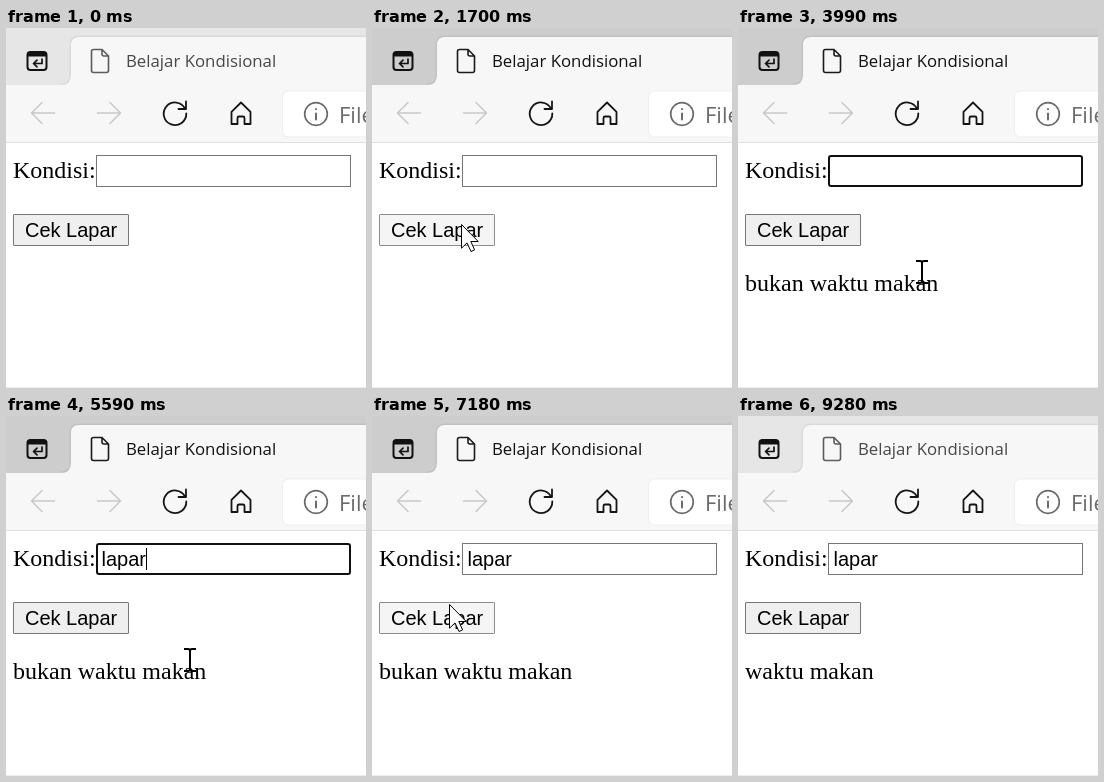
These frames come from a looping animation (360 by 360 pixels, 9.33 s). An HTML page:

```html
<!DOCTYPE html>
<html lang="id">
<head>
<meta charset="utf-8">
<title>Belajar Kondisional</title>
<style>
  html, body { margin: 0; width: 100%; height: 100%; overflow: hidden; background: #fff; }
  svg { display: block; width: 100vw; height: 100vh; }
  .line { fill: none; stroke-linecap: round; stroke-linejoin: round; }
  .serif { font: 24px "Liberation Serif", "Times New Roman", serif; }
  .sans { font: 20px "Liberation Sans", Arial, sans-serif; }
  .ui { font-family: "Open Sans", "Noto Sans", sans-serif; }
</style>
</head>
<body>
<svg viewBox="0 0 360 360">
  <rect width="360" height="360" fill="#fff"/>
  <rect y="359" width="360" height="1" fill="#ececec"/>

  <!-- tab strip -->
  <rect id="strip" width="360" height="58"/>
  <path d="M55 57Q65 57 65 47V17Q65 9 73 9H361" fill="none" stroke="#000" stroke-opacity=".06" stroke-width="3"/>
  <path d="M55 57Q65 57 65 47V17Q65 9 73 9H360V57Z" fill="#f7f7f7"/>
  <g class="line" stroke="#111" stroke-width="2">
    <rect x="21.5" y="24" width="19" height="18" rx="3"/>
    <path d="M22 26.5H40" stroke-width="4" stroke-linecap="butt"/>
    <path d="M36 31V35.5H28M31 32.2L27.5 35.5L31 38.8" stroke-width="1.7"/>
  </g>
  <path id="fileIcon" class="line" stroke-width="1.6" d="M87.5 21.5H96L102.5 28V42.5Q102.5 44.5 100.5 44.5H87.5Q85.5 44.5 85.5 42.5V23.5Q85.5 21.5 87.5 21.5ZM96 21.5V26Q96 28 98 28H102.5"/>
  <text id="tabTitle" class="ui" x="120" y="39" font-size="16.8">Belajar Kondisional</text>

  <!-- toolbar -->
  <rect y="57" width="360" height="58" fill="#f7f7f7"/>
  <rect y="114" width="360" height="1" fill="#e0e0e0"/>
  <g class="line" stroke="#c9c9c9" stroke-width="1.6">
    <path d="M48.5 85H26M36 74.5L25.5 85L36 95.5"/>
    <path d="M91.5 85H114M104 74.5L114.5 85L104 95.5"/>
  </g>
  <g class="line" stroke="#151515" stroke-width="1.8">
    <path d="M179 80.5A11.3 11.3 0 1 0 180.3 85.5M180 73.5V81H172.5"/>
    <path d="M225.5 83.8L235 74.5L244.5 83.8V96H238.5V90Q238.5 88.5 237 88.5H233Q231.5 88.5 231.5 90V96H225.5Z"/>
  </g>
  <rect x="276.5" y="63" width="95" height="46" rx="6" fill="#fff" stroke="#efefef"/>
  <g class="line" stroke="#6b6b6b" stroke-width="1.7">
    <circle cx="310" cy="86" r="11.3"/>
    <path d="M310 85.5V91.5M310 81V81.2" stroke-width="2"/>
  </g>
  <text class="ui" x="333" y="95" font-size="22" fill="#6b6b6b">File</text>

  <!-- page -->
  <text class="serif" x="7" y="150">Kondisi:</text>
  <rect id="field" fill="#fff"/>
  <text id="typed" class="sans" x="95.5" y="150"></text>
  <rect id="caret" y="132" width="1" height="22"/>
  <rect id="button" x="7.5" y="186.5" width="115" height="31" rx=".5"/>
  <text class="sans" x="19" y="209">Cek Lapar</text>
  <text id="answer" class="serif" x="7" y="263"></text>

  <g id="pointer">
    <path id="arrow" d="M.5 .5V24.2L6 18.9L10 27.5L13.6 25.9L9.8 17.5H17.2Z" fill="#fff" stroke="#000"/>
    <path id="beam" d="M-6 -11H-2Q0 -11 0 -9Q0 -11 2 -11H6M0 -9V9M-6 11H-2Q0 11 0 9Q0 11 2 11H6" fill="none" stroke="#000" stroke-width="2"/>
  </g>
</svg>
<script>
const LOOP = 9330;
const el = {};
document.querySelectorAll('[id]').forEach(node => el[node.id] = node);

const set = (node, attrs) => {
  for (const name in attrs) node.setAttribute(name, attrs[name]);
};
const show = (node, on) => set(node, { visibility: on ? 'visible' : 'hidden' });
const between = (v, lo, hi) => v >= lo && v < hi;

// Pointer moves; each key is [time, x, y].
const moves = [
  { start: 350, step: 64.5, keys: [[200, 336, 385], [350, 301, 344], [1060, 122, 207], [1270, 90, 197], [1320, 89, 196]] },
  { start: 2320, step: 66, keys: [[2254, 89, 196], [2650, 117, 172], [3050, 165, 146]] },
  { start: 3360, step: 65, keys: [[3295, 165, 146], [3490, 183, 245]] },
  { start: 3990, step: 65, keys: [[3990, 184, 244]] },
  { start: 5840, step: 72.5, keys: [[5767, 184, 244], [5985, 204, 240], [6420, 117, 177], [6780, 77, 188]] },
  { start: 7750, step: 60, keys: [[7690, 77, 188], [7870, 154, 191], [8650, 325, 350], [8720, 336, 362]] }
];
const keystrokes = [4480, 4730, 5050, 5230, 5590];
const caretX = [96, 99, 111, 122, 133, 140];

// Smooth curve through the keys, at rest on both ends.
function along(keys, t) {
  const last = keys.length - 1;
  if (t <= keys[0][0]) return keys[0].slice(1);
  if (t >= keys[last][0]) return keys[last].slice(1);
  const i = keys.findIndex(key => key[0] > t) - 1;
  const span = keys[i + 1][0] - keys[i][0];
  const u = (t - keys[i][0]) / span;
  const slope = (k, axis) => k === 0 || k === last ? 0
    : (keys[k + 1][axis] - keys[k - 1][axis]) / (keys[k + 1][0] - keys[k - 1][0]);
  return [1, 2].map(axis => {
    const a = keys[i][axis], b = keys[i + 1][axis], s = u * u * (3 - 2 * u);
    return a + (b - a) * s
      + span * u * (1 - u) * (slope(i, axis) * (1 - u) - slope(i + 1, axis) * u);
  });
}

function pointerAt(t) {
  const move = moves.filter(m => m.start <= t).pop();
  if (!move || t >= 8720) return null;
  const sampled = move.start + Math.floor((t - move.start) / move.step) * move.step;
  return along(move.keys, sampled).map(Math.round);
}

function drawField(focused, hovered) {
  set(el.field, focused
    ? { x: 91, y: 128, width: 253, height: 30, rx: 2, stroke: '#101010', 'stroke-width': 2 }
    : { x: 90.5, y: 127.5, width: 254, height: 31, rx: 0, stroke: hovered ? '#4f4f4f' : '#767676', 'stroke-width': 1 });
}

function render(t) {
  const active = between(t, 1700, 9280);
  set(el.strip, { fill: active ? '#cdcdcd' : '#e6e6e6' });
  set(el.fileIcon, { stroke: active ? '#1a1a1a' : '#5c5c5c' });
  set(el.tabTitle, { fill: active ? '#111' : '#484848' });

  const pos = pointerAt(t);
  const [x, y] = pos || [-99, -99];
  const overButton = between(x, 7, 123) && between(y, 186, 218);
  const overField = between(x, 90, 345) && between(y, 127, 159);
  const answer = t >= 7300 ? 'waktu makan' : t >= 1770 ? 'bukan waktu makan' : '';
  const overAnswer = answer && between(x, 7, 201) && between(y, 242, 269);
  const useBeam = overField || overAnswer;
  set(el.pointer, { transform: `translate(${x} ${y})` });
  show(el.arrow, pos && !useBeam);
  show(el.beam, pos && useBeam);

  const pressed = between(t, 1700, 1770) || between(t, 7180, 7300);
  const [fill, stroke] = pressed ? ['#f5f5f5', '#8d8d8d']
    : overButton ? ['#e5e5e5', '#4f4f4f'] : ['#efefef', '#767676'];
  set(el.button, { fill, stroke });

  const focused = between(t, 3230, 7180);
  drawField(focused, overField);
  const count = keystrokes.filter(k => k <= t).length;
  el.typed.textContent = 'lapar'.slice(0, count);
  const idle = t - (count ? keystrokes[count - 1] : 3230);
  set(el.caret, { x: caretX[count] });
  show(el.caret, focused && !between(idle, 510, 1070));
  el.answer.textContent = answer;
}

const began = performance.now();
function tick() {
  render((performance.now() - began) % LOOP);
  requestAnimationFrame(tick);
}
tick();
</script>
</body>
</html>
```
